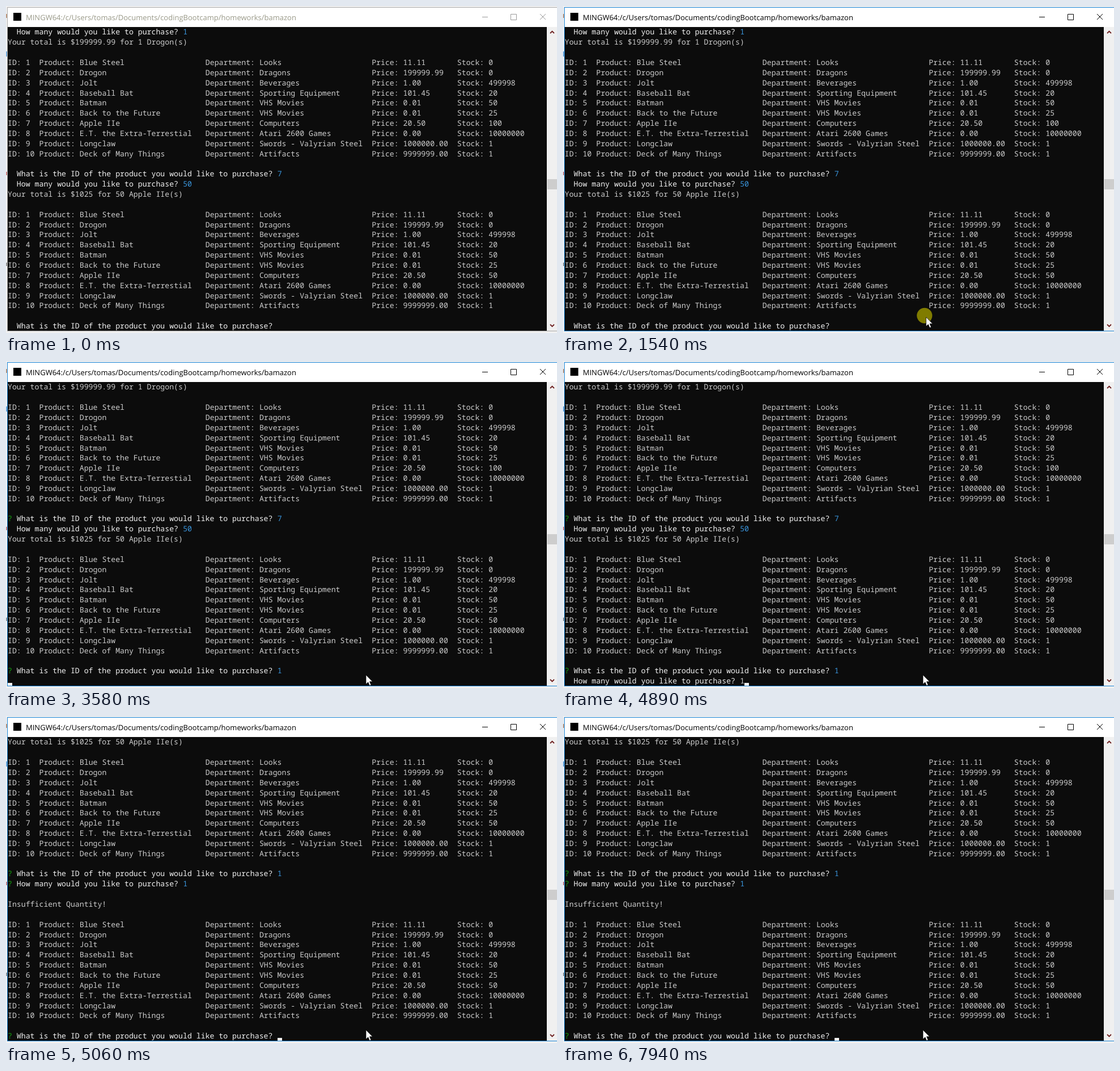
Recreate the animation shown at these times as an HTML page. Size 972x576 px, loop 8 s.

```html
<!DOCTYPE html>
<html lang="en">
<head>
<meta charset="utf-8">
<title>Terminal session</title>
<style>
  html, body { margin: 0; width: 100%; height: 100%; overflow: hidden; background: #f0f0f0; }
  svg { display: block; }
  text { white-space: pre; text-rendering: geometricPrecision; }
  #rows text { font: 13.21px "Noto Sans Mono", monospace; }
  #title { font: 13px "Open Sans", sans-serif; }
</style>
</head>
<body>
<svg width="972" height="576" viewBox="0 0 972 576">
  <rect width="972" height="576" fill="#f0f0f0"/>
  <g id="strip">
    <rect y="14" width="1.5" height="7" fill="#b08060"/>
    <rect y="80" width="1.5" height="9" fill="#4a90d0"/>
    <rect y="292" width="1.5" height="6" fill="#c06060"/>
    <rect y="452" width="1.5" height="6" fill="#777"/>
  </g>
  <rect id="frame" x="2" y="2" width="980" height="571"/>
  <rect x="3" y="3" width="969" height="34" fill="#fff"/>
  <rect x="13" y="12" width="14" height="14" fill="#000"/>
  <text id="title" x="35" y="24.5">MINGW64:/c/Users/tomas/Documents/codingBootcamp/homeworks/bamazon</text>
  <path id="buttons" fill="none" d="M840 19.5h10M890.5 14.5h10v10h-10zM942 14l10 10M952 14l-10 10"/>
  <rect x="3" y="37" width="951" height="535" fill="#0c0c0c"/>
  <rect x="954" y="37" width="18" height="535" fill="#f0f0f0"/>
  <rect id="thumb" x="955" width="17" height="18" fill="#cdcdcd"/>
  <path d="M960 48l3.5-3.5 3.5 3.5M960 561l3.5 3.5 3.5-3.5" fill="none" stroke="#6e2020" stroke-width="1.8"/>
  <g id="rows"></g>
  <rect id="caret" width="8" height="5" fill="#f2f2f2"/>
  <circle id="click" cx="637.8" cy="545.3" r="13.6" fill="#807c00"/>
  <path id="pointer" d="M0 0V16.3L3.8 12.8 6.4 18.8 9 17.7 6.5 11.8H11.6Z" fill="#fff" stroke="#000" stroke-width=".7"/>
</svg>
<script>
const LOOP = 8000, LEFT = 3, TOP = 37, CELL = 7.928, PITCH = 17.85, LAST = 29;
const GREY = '#cccccc', WHITE = '#f2f2f2', BLUE = '#3a96dd', GREEN = '#13a10e';
const $ = id => document.getElementById(id);

const goods = stock7 => [
  ['Blue Steel', 'Looks', '11.11', 0],
  ['Drogon', 'Dragons', '199999.99', 0],
  ['Jolt', 'Beverages', '1.00', 499998],
  ['Baseball Bat', 'Sporting Equipment', '101.45', 20],
  ['Batman', 'VHS Movies', '0.01', 50],
  ['Back to the Future', 'VHS Movies', '0.01', 25],
  ['Apple IIe', 'Computers', '20.50', stock7],
  ['E.T. the Extra-Terrestial', 'Atari 2600 Games', '0.00', 10000000],
  ['Longclaw', 'Swords - Valyrian Steel', '1000000.00', 1],
  ['Deck of Many Things', 'Artifacts', '9999999.00', 1]
];

// A line is a list of pieces: [column, text, colour]
const plain = s => [[0, s, GREY]];
const table = stock7 => goods(stock7).map(([name, dept, price, stock], i) => [
  [0, 'ID: ' + (i + 1), GREY],
  [7, 'Product: ' + name, GREY],
  [44, 'Department: ' + dept, GREY],
  [81, 'Price: ' + price, GREY],
  [100, 'Stock: ' + stock, GREY]
]);
const ask = (question, col, answer, mark, colour = BLUE) => [
  [0, mark ? '?' : '', GREEN], [2, question, WHITE], [col, answer, colour]
];
const askId = (...a) => ask('What is the ID of the product you would like to purchase?', 60, ...a);
const askCount = (...a) => ask('How many would you like to purchase?', 39, ...a);

function session(t) {
  const sent = t >= 3580, done = t >= 4990;
  const lines = [
    askCount('1', false),
    plain('Your total is $199999.99 for 1 Drogon(s)'), [],
    ...table(100), [],
    askId('7', sent),
    askCount('50', done),
    plain('Your total is $1025 for 50 Apple IIe(s)'), [],
    ...table(50), [],
    askId(t >= 2880 ? '1' : '', sent, sent ? BLUE : GREY)
  ];
  if (sent) lines.push(t < 3650 ? [] : askCount(t >= 4890 ? '1' : '', done, done ? BLUE : GREY));
  if (done) {
    const list = table(50);
    lines.push([], plain('Insufficient Quantity!'), []);
    if (t < 5060) lines.push(...list.slice(0, 2), []);
    else lines.push(...list, [], askId('', true));
  }
  return lines.slice(-LAST - 1);
}

// [time, caret column]; -1 hides the caret
const carets = [
  [0, -1], [2175, 60], [2660, -1], [2880, 61], [3210, -1], [3580, 0], [3650, 39],
  [4200, -1], [4750, 39], [4890, 40], [4990, 0], [5060, 60], [5300, -1], [5770, 60],
  [6310, -1], [6860, 60], [7290, -1], [7940, 60]
];

// [start, end, steps, x0, y0, x1, y1]
const moves = [
  [320, 320, 1, 728, 491, 702, 466],
  [620, 1070, 7, 702, 466, 642, 542],
  [1300, 1385, 2, 642, 542, 640.5, 548],
  [2090, 2430, 5, 640.5, 548, 635, 553]
];

function pointerAt(t) {
  let pos = [728, 491];
  for (const [a, b, n, x0, y0, x1, y1] of moves) {
    if (t < a) break;
    const k = b > a ? Math.floor((t - a) / (b - a) * (n - 1) + 1e-6) : 0;
    const p = Math.min(1, (k + 1) / n), e = p * p * (3 - 2 * p);
    pos = [x0 + (x1 - x0) * e, y0 + (y1 - y0) * e];
  }
  return pos;
}

const set = (id, attrs) => {
  for (const k in attrs) $(id).setAttribute(k, attrs[k]);
};
const show = (id, on) => set(id, { visibility: on ? 'visible' : 'hidden' });

const redraws = [0, 2880, 3580, 3650, 4890, 4990, 5060];
let drawn = -1;

function drawRows(t) {
  const stage = redraws.filter(r => r <= t).length;
  if (stage === drawn) return;
  drawn = stage;
  $('rows').innerHTML = session(t).map((line, row) => line.map(([col, s, colour]) =>
    `<text x="${LEFT + col * CELL}" y="${TOP + 13.4 + row * PITCH}" fill="${colour}">${s}</text>`
  ).join('')).join('');
}

function render(t) {
  const active = t >= 1385;
  const ink = active ? '#000' : '#999';
  drawRows(t);
  set('frame', { fill: active ? '#1883d7' : '#aaa' });
  set('title', { fill: active ? '#000' : '#999988' });
  set('buttons', { stroke: ink });
  set('thumb', { y: t >= 4990 ? 306 : 305 });

  const col = carets.filter(c => c[0] <= t).pop()[1];
  show('caret', col >= 0);
  set('caret', { x: Math.round(LEFT + col * CELL), y: 567 });

  show('click', t >= 1385 && t < 1640);
  show('pointer', t >= 220);
  set('pointer', { transform: `translate(${pointerAt(t)})` });
}

function tick(now) {
  render(now % LOOP);
  requestAnimationFrame(tick);
}
render(0);
requestAnimationFrame(tick);
</script>
</body>
</html>
```
